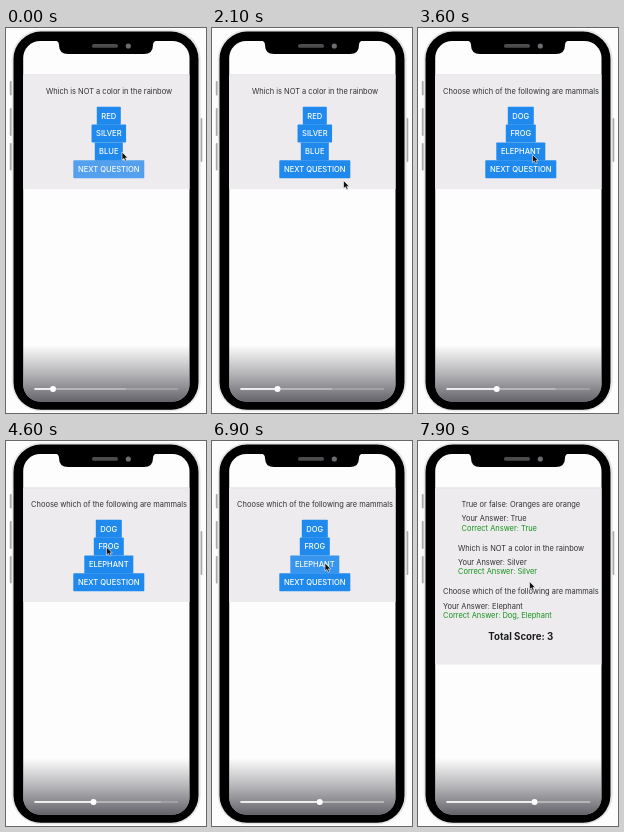
An HTML page that plays this animation: 200 px wide and 385 px high, repeating every 8000 ms.

```html
<!DOCTYPE html>
<html lang="en">
<head>
<meta charset="utf-8">
<title>Quiz on a phone</title>
<style>
  html, body { margin: 0; width: 100%; height: 100%; overflow: hidden; background: #fdfdfd; }
  svg { display: block; width: 200px; height: 385px; }
  text { font: 7.46px Inter, Roboto, sans-serif; fill: #303032; }
  .button rect { fill: #1f89ee; }
  .button text { fill: #fff; font-size: 7.55px; font-weight: 500; text-anchor: middle; }
  .question { text-anchor: middle; }
  .correct { fill: #15921a; }
  .total { font-size: 9.7px; font-weight: 700; fill: #1c1c1e; text-anchor: middle; }
</style>
</head>
<body>
<svg viewBox="0 0 200 385">
  <defs>
    <linearGradient id="shade" x2="0" y2="1">
      <stop offset="0" stop-color="#4a4a52" stop-opacity="0"/>
      <stop offset=".5" stop-color="#4a4a52" stop-opacity=".4"/>
      <stop offset="1" stop-color="#4a4a52" stop-opacity=".86"/>
    </linearGradient>
    <clipPath id="glass"><rect x="17.2" y="13" width="166.3" height="360.5" rx="17"/></clipPath>
  </defs>

  <!-- Phone body and side keys -->
  <g fill="#a9a9ab">
    <rect x="3.8" y="53" width="1.9" height="14.5" rx=".9"/>
    <rect x="3.8" y="80" width="1.9" height="28" rx=".9"/>
    <rect x="3.8" y="115" width="1.9" height="27.5" rx=".9"/>
    <rect x="194.4" y="90" width="1.9" height="44" rx=".9"/>
  </g>
  <rect x="6.2" y="2.2" width="188" height="380.6" rx="29" fill="#e8e8e8" stroke="#d4d4d4" stroke-width=".5"/>
  <rect x="7.5" y="3.6" width="185" height="378.2" rx="27.5"/>

  <g clip-path="url(#glass)">
    <rect x="17" y="13" width="167" height="361" fill="#fdfdfd"/>
    <rect id="panel" x="17" y="47" width="167" fill="#edebee"/>
    <path d="M17 46.8H184" stroke="#d9d9db" stroke-width=".7"/>
    <g id="screens"></g>
    <rect x="17" y="317" width="167" height="57" fill="url(#shade)"/>
    <g fill="none" stroke-width="1.6">
      <path d="M28.5 361H172" stroke="#fff" stroke-opacity=".28"/>
      <path id="buffer" stroke="#fff" stroke-opacity=".3"/>
      <path id="played" stroke="#fff"/>
    </g>
    <circle id="knob" cy="361" r="3" fill="#fff"/>
  </g>

  <!-- Notch -->
  <path d="M49 12.5Q53 13 53 17Q53 26 62 26H138Q147 26 147 17Q147 13 151 12.5Z"/>
  <rect x="86" y="16" width="26" height="3.8" rx="1.9" fill="#4c4c4e"/>
  <circle cx="122.3" cy="18" r="2.6" fill="#6c6d73"/>

  <path id="cursor" d="M0 0V8L1.9 6.4L3.2 9.2L4.6 8.6L3.4 5.9H5.8Z"
        fill="#111" stroke="#fff" stroke-width=".6"/>
</svg>

<script>
const LOOP = 8000, STEP = 100;
const SECOND_QUESTION = 2600, RESULTS = 7600;
const $ = id => document.getElementById(id);

const label = (x, y, text, kind = '') => `<text x="${x}" y="${y}" class="${kind}">${text}</text>`;

// Each button: label, width, then [down, up] times of its presses.
const button = ([text, width], row) => `<g class="button">
  <rect x="${102.8 - width / 2}" y="${78.8 + row * 17.8}" width="${width}" height="18" rx=".8"/>
  ${label(102.8, 90.5 + row * 17.8, text)}</g>`;

const next = ['NEXT QUESTION', 71, [-300, -150], [2450, 2650], [7400, 7650]];
const quizzes = [
  ['Which is NOT a color in the rainbow',
    [['RED', 24], ['SILVER', 34.5, [1400, 1600]], ['BLUE', 28], next]],
  ['Choose which of the following are mammals',
    [['DOG', 26, [5600, 5850]], ['FROG', 30], ['ELEPHANT', 49, [6450, 6720]], next]]
];

const answers = [
  [43.5, 66, 'True or false: Oranges are orange', 'True', 'True'],
  [40, 109.6, 'Which is NOT a color in the rainbow', 'Silver', 'Silver'],
  [25, 153.4, 'Choose which of the following are mammals', 'Elephant', 'Dog, Elephant']
];

$('screens').innerHTML = quizzes.map(([question, buttons]) =>
  `<g>${label(103, 66, question, 'question')}${buttons.map(button).join('')}</g>`
).join('') + '<g>' + answers.map(([x, y, question, given, correct]) =>
  label(x, y, question) +
  label(x, y + 14.4, 'Your Answer: ' + given) +
  label(x, y + 23.6, 'Correct Answer: ' + correct, 'correct')
).join('') + label(102.8, 199.3, 'Total Score: 3', 'total') + '</g>';

const screens = [...$('screens').children];

// Pointer stops: time, x, y
const stops = [
  [0, 116, 124], [400, 118, 108], [900, 121, 75], [1150, 120, 75],
  [1400, 108, 104], [1650, 108, 104], [2100, 131.5, 152.5],
  [2400, 126, 142], [2700, 126, 142], [3200, 121, 88],
  [3600, 114.5, 126.5], [3900, 115, 120], [4200, 104, 95], [4600, 100.5, 106],
  [5000, 112, 92], [5500, 102, 86], [6000, 102, 86],
  [6400, 113, 122], [6950, 113, 122], [7350, 112, 141], [8000, 111.5, 140.5]
];

const clamp = v => Math.min(1, Math.max(0, v));
const ease = p => p < .5 ? 2 * p * p : 1 - 2 * (1 - p) ** 2;

function pointer(t) {
  const i = stops.findIndex(s => s[0] > t);
  const [t0, x0, y0] = stops[i - 1], [t1, x1, y1] = stops[i];
  const p = ease((t - t0) / (t1 - t0));
  return [x0 + (x1 - x0) * p, y0 + (y1 - y0) * p];
}

// A press dims the button quickly; release brings it back over 250 ms.
function opacity(t, presses) {
  return presses.reduce((value, [down, up]) => {
    const dim = ease(clamp((t - down) / 150)) * (1 - ease(clamp((t - up) / 250)));
    return value - .8 * dim;
  }, 1);
}

function draw(now) {
  const t = Math.floor(now % LOOP / STEP) * STEP;
  const current = t < SECOND_QUESTION ? 0 : t < RESULTS ? 1 : 2;
  screens.forEach((s, i) => s.style.display = i === current ? '' : 'none');
  $('panel').setAttribute('height', current < 2 ? 114 : 176.5);

  if (current < 2) {
    const groups = screens[current].querySelectorAll('.button');
    quizzes[current][1].forEach(([, , ...presses], i) =>
      groups[i].setAttribute('opacity', opacity(t, presses)));
  }

  // The video loads in equal chunks ahead of the knob.
  const x = 47 + t * .0088, loaded = 120 + 17.4 * Math.floor(t / 2300);
  $('knob').setAttribute('cx', x);
  $('played').setAttribute('d', `M28.5 361H${x}`);
  $('buffer').setAttribute('d', `M28.5 361H${loaded}`);
  $('cursor').setAttribute('transform', `translate(${pointer(t)})`);
  requestAnimationFrame(draw);
}
requestAnimationFrame(draw);
</script>
</body>
</html>
```
